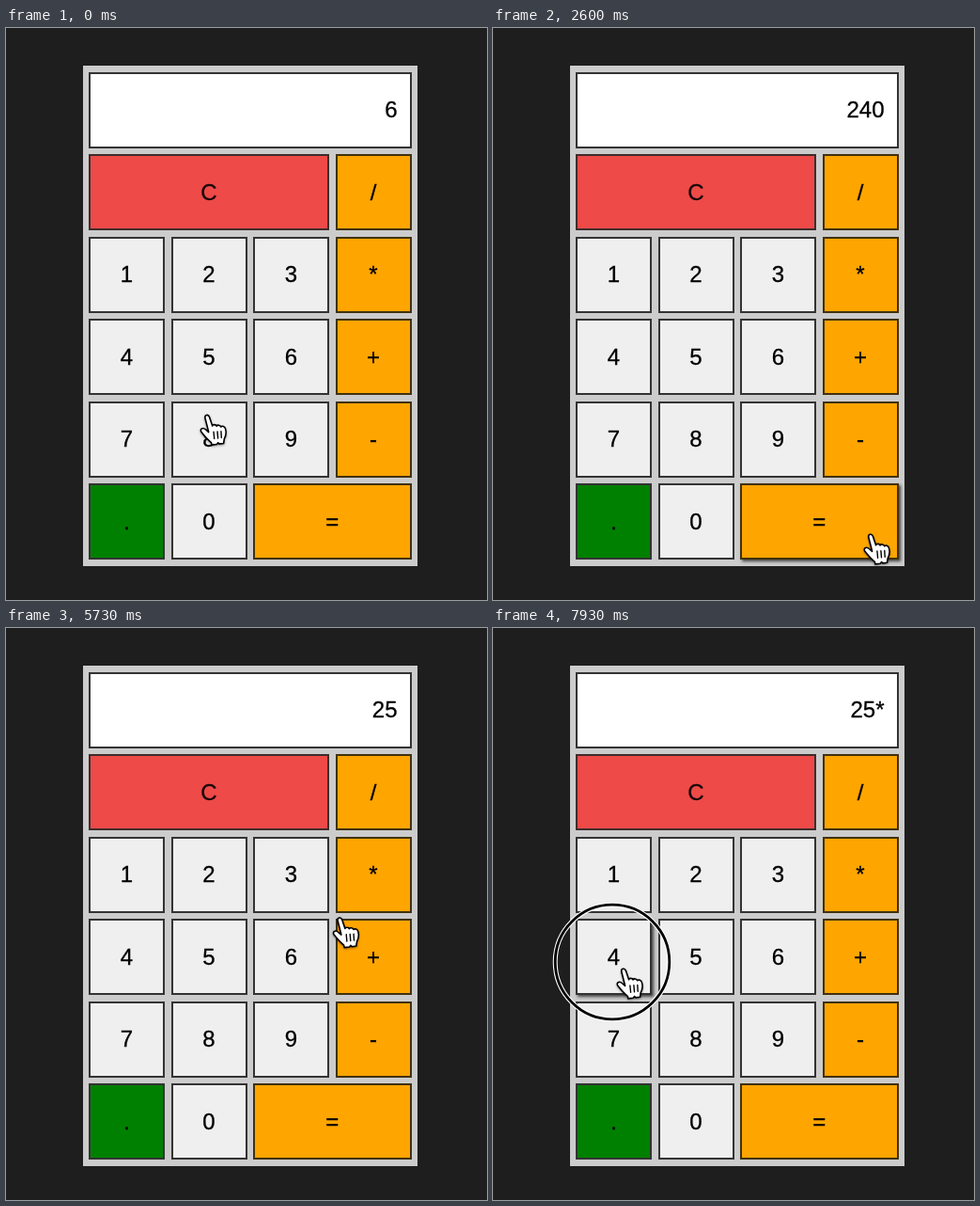
Recreate the animation shown at these times as an HTML page. Size 512 by 608 pixels, loop 8 s.

```html
<!DOCTYPE html>
<html lang="en">
<head>
<meta charset="utf-8">
<title>Calculator</title>
<style>
  html, body { margin: 0; width: 100%; height: 100%; overflow: hidden; background: #1e1e1e; }
  #stage { position: relative; width: 512px; height: 608px; overflow: hidden; }
  #panel {
    position: absolute; left: 81.5px; top: 40px; padding: 6.5px;
    display: grid; grid: repeat(6, 81px) / repeat(4, 81px); gap: 6.5px;
    background: #ccc; color: #000;
    font: 24px "Liberation Sans", Arial, Helvetica, sans-serif;
    -webkit-text-stroke: .3px;
  }
  #panel > * {
    display: flex; align-items: center; justify-content: center;
    box-sizing: border-box; border: 2px solid #333; background: #efefef;
  }
  #panel > #display {
    grid-column: span 4; justify-content: flex-end; padding-right: 13px; background: #fff;
  }
  #panel > .op { background: #ffa500; border-color: #40310f; }
  #panel > .clear { grid-column: span 3; background: #ed4a48; border-color: #402c2c; color: #180808; }
  #panel > .dot { background: #008000; }
  #panel > .equals { grid-column: span 2; }
  #panel > .hover { box-shadow: 2px 2px 3px #444; }
  svg { position: absolute; left: 0; top: 0; }
  #hand { filter: drop-shadow(0 1px 1px rgba(0, 0, 0, .4)); }
</style>
</head>
<body>
<div id="stage">
  <div id="panel"><div id="display"></div></div>
  <svg width="512" height="608" fill="none">
    <g id="ring">
      <circle r="60.8" stroke="#fff" stroke-width="5"/>
      <circle r="60.8" stroke="#000" stroke-width="2.8"/>
    </g>
    <g id="hand" stroke="#000" stroke-linecap="round" stroke-linejoin="round">
      <path fill="#fff" stroke-width="1.6" d="M6.6 5C5.6 1.2 9.9 .2 11.1 3.6L14.3 13
        C14.6 11.3 18 11.2 18.8 13.2C19.5 11.7 22.6 11.9 23.4 14
        C24.6 12.8 27.5 13.4 28.2 16.2C29.4 20.5 28.8 23.5 26.9 27L26.2 31.6
        L21.6 32.2L20.3 30.9L19 32.6L13.6 33.2L13 30.6C9.6 28 6 24 2.6 19.6
        C.4 16.6 4 14 7 16.8L10.3 19.6Z"/>
      <path stroke-width="1.4" d="M15.6 19.3L16.3 26.6M19.6 18.9L20.2 26.2M23.5 18.7L23.9 25.6"/>
    </g>
  </svg>
</div>
<script>
const LOOP = 8000, HOVER_LAG = 20, PRESS_DELAY = 150, ENTRY_LEAD = 60;
const $ = id => document.getElementById(id);
const panel = $('panel'), display = $('display'), ring = $('ring'), hand = $('hand');

const kinds = { 'C': 'clear', '.': 'dot', '=': 'op equals', '/': 'op', '*': 'op', '+': 'op', '-': 'op' };
const keys = [...'C/123*456+789-.0='].map(label => {
  const el = document.createElement('div');
  el.className = kinds[label] || '';
  el.textContent = label;
  panel.append(el);
  return el;
}).map(el => ({ el, box: el.getBoundingClientRect() }));

// The pointer leaves the stop before, arrives at x, y and presses the key, if any.
const stops = [
  { key: '0', x: 214, y: 544, leave: -43, arrive: 200 },
  { key: '*', x: 394, y: 283, leave: 490, arrive: 830 },
  { key: '4', x: 130, y: 354, leave: 1080, arrive: 1260 },
  { key: '=', x: 390, y: 531, leave: 1520, arrive: 2080, hold: 350 },
  { key: 'C', x: 291, y: 190, leave: 3030, arrive: 3430 },
  { key: '2', x: 224, y: 258, leave: 4030, arrive: 4470 },
  { key: '5', x: 223, y: 341, leave: 4800, arrive: 5190 },
  { key: '*', x: 391, y: 278, leave: 5530, arrive: 5840, sag: 6 },
  { key: '', x: 309, y: 347, leave: 6600, arrive: 7150 },
  { key: '4', x: 127, y: 355, leave: 7400, arrive: 7775, sag: 30 }
];
const entry = { x: 201, y: 391 };

const presses = stops.filter(s => s.key).map(({ key, x, y, arrive, hold = 160 }) => {
  const down = arrive + PRESS_DELAY;
  return { key, x, y, down, up: down + hold };
});

function pointer(t) {
  const i = Math.max(0, stops.findLastIndex(s => s.leave <= t));
  const from = stops[i - 1] || entry, to = stops[i];
  const u = Math.min(1, Math.max(0, (t - to.leave) / (to.arrive - to.leave)));
  const s = u * u * (3 - 2 * u);
  return {
    x: from.x + (to.x - from.x) * s,
    y: from.y + (to.y - from.y) * s + (to.sag || 0) * 4 * s * (1 - s)
  };
}

function enter(text, key) {
  if (key === 'C') return '';
  if (key === '=') return String(text.split('*').reduce((a, b) => a * b));
  return text + key;
}

const reading = t => presses
  .filter(p => t >= p.up - ENTRY_LEAD)
  .reduce((text, p) => enter(text, p.key), '6');

const place = (el, x, y) => el.setAttribute('transform', `translate(${x} ${y})`);

function draw(t) {
  const tip = pointer(t);
  place(hand, tip.x + 3.3, tip.y + 5.7);

  const press = presses.find(p => t >= p.down && t < p.up);
  ring.style.display = press ? '' : 'none';
  if (press) place(ring, press.x, press.y);

  const { x, y } = pointer(t - HOVER_LAG);
  for (const { el, box } of keys) {
    const over = x >= box.left && x < box.right && y >= box.top && y < box.bottom;
    el.classList.toggle('hover', over);
  }

  display.textContent = reading(t);
}

const start = performance.now();
function tick() {
  draw((performance.now() - start) % LOOP);
  requestAnimationFrame(tick);
}
tick();
</script>
</body>
</html>
```
